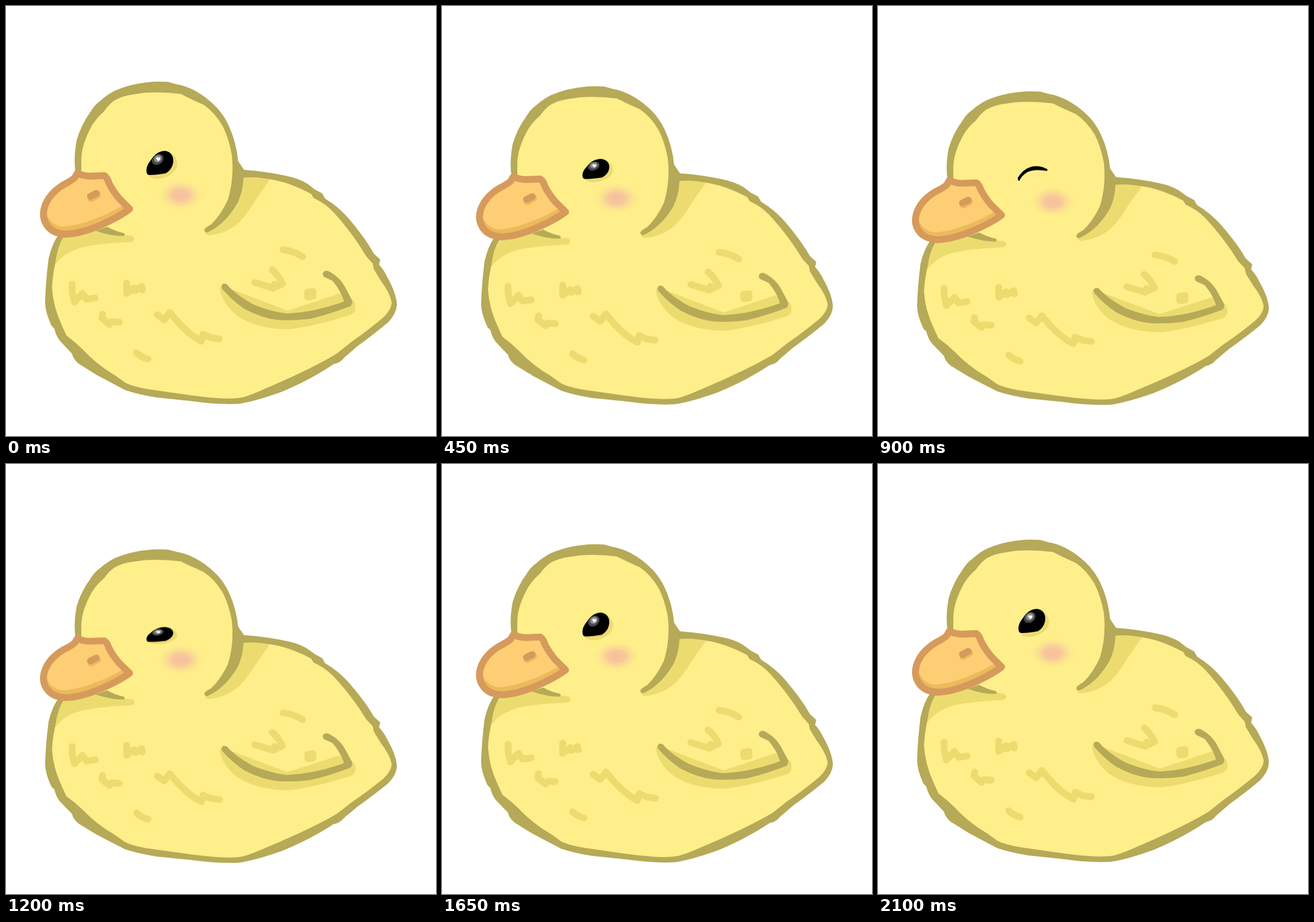
Recreate the animation shown at these times as an HTML page without scripts. Size 748 by 748 pixels, loop 3.05 s.

```html
<!DOCTYPE html>
<html lang="en">
<head>
<meta charset="utf-8">
<title>Duckling</title>
<style>
  html, body { margin: 0; width: 100%; height: 100%; overflow: hidden; background: #fff; }
  svg { display: block; width: 100vw; height: 100vh; }

  .line { fill: #b6a957; }
  .down { fill: #feef8a; }
  .shade { fill: #ecdc70; }
  .tufts { fill: none; stroke: #ecdc70; stroke-width: 12; stroke-linecap: round; stroke-linejoin: round; }
  .rim { fill: none; stroke: #d69a5c; stroke-width: 12; stroke-linejoin: round; stroke-linecap: round; }

  .duck, .eye, .lid { animation: 3050ms step-end infinite; }
  .duck { transform-origin: 0 748px; animation-name: squash; }
  .eye { transform-origin: 0 294px; animation-name: squint; }
  .lid { visibility: hidden; animation-name: shut; }

  @keyframes squash {
    0% { transform: none; }
    6.557% { transform: scaleY(.992); }
    14.754% { transform: scaleY(.987); }
    19.672% { transform: scaleY(.9802); }
    26.229% { transform: scaleY(.9727); }
    44.262% { transform: scaleY(.987); }
    59.016% { transform: scaleY(.992); }
    68.852%, 100% { transform: none; }
  }
  @keyframes squint {
    0% { transform: none; visibility: visible; }
    9.836% { transform: translateY(1px) scaleY(.843); }
    19.672% { transform: translateY(3px) scaleY(.63); visibility: visible; }
    29.508% { transform: translateY(3px) scaleY(.63); visibility: hidden; }
    39.344% { transform: translateY(3px) scaleY(.63); visibility: visible; }
    44.262% { transform: translateY(1px) scaleY(.843); }
    54.098%, 100% { transform: none; visibility: visible; }
  }
  @keyframes shut {
    0% { visibility: hidden; }
    29.508% { visibility: visible; }
    39.344%, 100% { visibility: hidden; }
  }
</style>
</head>
<body>
<svg viewBox="0 0 748 748">
  <defs>
    <radialGradient id="blush">
      <stop offset="0" stop-color="#f8bf9f"/>
      <stop offset=".35" stop-color="#f8c39d" stop-opacity=".92"/>
      <stop offset=".7" stop-color="#fad896" stop-opacity=".5"/>
      <stop offset="1" stop-color="#feef8a" stop-opacity="0"/>
    </radialGradient>
  </defs>

  <g class="duck">
    <!-- outline and down -->
    <path class="line" d="M121 290Q117 265 123 233Q131 206 147 184Q154 172 164 165Q176 154 190 147Q225 132 266 131.500L282 132L296 136Q313 139 328 147Q349 158 368 178Q380 192 387 207Q401 237 404 272Q406 281 414 285Q455 288 490 296Q509 300 524 309L537 319L550 326L555 335Q583 352 603 378Q627 407 640 431L651 441L649 450Q658 460 664 473Q679 500 680 520Q679 535 665 550Q640 571 611 592L588 612Q581 621 570 623Q530 650 480 671Q430 689 404 692Q370 694 320 687L262 681Q230 676 207 668L158 642L150 637L126 622Q116 613 115 605L98 587Q88 578 84 561L79 556Q68 532 68 515Q69 480 74 440Q80 413 92 397Z"/>
    <path class="down" d="M131 290V268Q131 241 150 207Q159 193 170 184Q179 171 189 164Q204 156 220 154L240 151Q273 149 304 153L320 161L344 172Q363 185 377 209Q388 231 393 260L404 290L413 299Q434 297 456 301Q490 305 531 327L535 334Q555 343 570 359Q602 394 627 436L638 448L640 458L652 478Q668 499 671 516Q670 529 656 542Q630 564 600 585L575 605Q530 632 450 666Q417 681 404 682Q380 685 320 677L250 667Q220 662 207 655L189 642Q158 624 133 597L120 585L105 573Q100 562 97 555Q82 523 80 490Q81 465 88 438Q93 413 104 398Z"/>

    <!-- soft shadows -->
    <path class="shade" d="M101 400L160 390Q185 398 217 399Q224 401 223 406Q222 411 212 411Q164 413 132 420Q100 429 86 450Q88 420 101 400Z"/>
    <path class="shade" d="M411 299Q434 296 459 302Q446 320 434 338Q420 362 405 377Q382 397 352 399Q346 398 346 391L390 345Z"/>
    <path class="shade" d="M375 486Q370 490 374 501Q382 523 402 539Q436 562 490 562.500Q530 559 600 537Q612 532 606 514L580 500L490 530Z"/>

    <g class="tufts">
      <path d="M115 484V497L119 515L133 500L140 510L155 508"/>
      <path d="M210 482V500L223 490L225 495L236 488L237 494"/>
      <path d="M168 536L167 543L180 554L184 549L197 550"/>
      <path d="M263 537L275 546L285 533L301 552Q322 574 340 583L343 571L356 577L371 579"/>
      <path d="M227 603Q235 611 247 614"/>
      <path d="M482 424Q500 426 516 436"/>
      <path d="M433 481L465 491L467 484M463 459Q473 467 481 483L466 490"/>
      <path d="M525 498L534 497V505L525 506Z"/>
    </g>

    <!-- wing, neck and chin lines -->
    <path class="line" d="M375 488Q376 481 384 484Q399 502 430 519Q465 533 490 535Q537 533 588 514Q583 496 568 478L553 471Q549 466 553 462Q558 458 566 464Q583 474 592 493L602 512Q604 522 594 524Q560 537 530 544Q500 548 472 546Q445 543 415 527Q394 513 376 492Z"/>
    <path class="line" d="M393 260L404 270L414 285L413 300Q412 323 403 342Q394 358 382 371Q365 388 350 394Q345 394 345 389Q347 385 357 380Q374 363 386 337Q395 308 394 275Z"/>
    <path class="line" d="M156 391L176 384Q190 392 205 395Q208 398 205 400Q184 401 156 391Z"/>

    <ellipse cx="304" cy="329" rx="41" ry="28" fill="url(#blush)"/>

    <g class="eye">
      <path class="shade" d="M247 293Q251 301 263 301Q286 299 296 283Q301 268 290 258Z"/>
      <path d="M245 291Q242 280 252 268Q262 252 277 252Q290 254 291 268Q291 283 278 291Q262 294 250 294Q246 294 245 291Z"/>
      <g transform="rotate(-38 264 267)">
        <ellipse cx="264" cy="267" rx="11" ry="8.500" fill="#484848"/>
        <ellipse cx="265" cy="266" rx="7" ry="6" fill="#8b8b8b"/>
      </g>
      <path fill="#fff" d="M265 270L261.500 266Q261 263 263.500 263L265 264L267 263Q269 264 268 267Z"/>
    </g>
    <path class="lid" d="M244 291.400L243 286.300Q252 271 266 266.700Q280 262.600 295 271L294 274Q272 270 260 276Q250 282 246 291.400Z"/>

    <!-- beak -->
    <path fill="#fece74" d="M124 291L171 295L215 353L104 397L67 365L100 311Z"/>
    <path fill="#fece74" d="M67 365Q63 335 100 311L124 300L140 380L104 397Q70 395 67 365Z"/>
    <path fill="#ecb95b" d="M68 354Q74 380 98 384Q125 382 150 372Q180 361 203 347L215 353Q200 365 165 381Q130 396 104 397Q84 396 74 385Q64 372 68 354Z"/>
    <path class="rim" d="M124 291Q136 296 146 296L171 295Q176 298 179 308Q186 322 197 335L215 353Q200 365 165 381Q130 396 104 397Q84 396 74 385Q61 370 67 350Q74 327 100 311Q117 302 120 298Z"/>
    <path class="rim" style="stroke:#ecb95b" d="M148 335L159 329"/>
    <path class="rim" d="M147 331L157 326"/>
  </g>
</svg>
</body>
</html>
```
